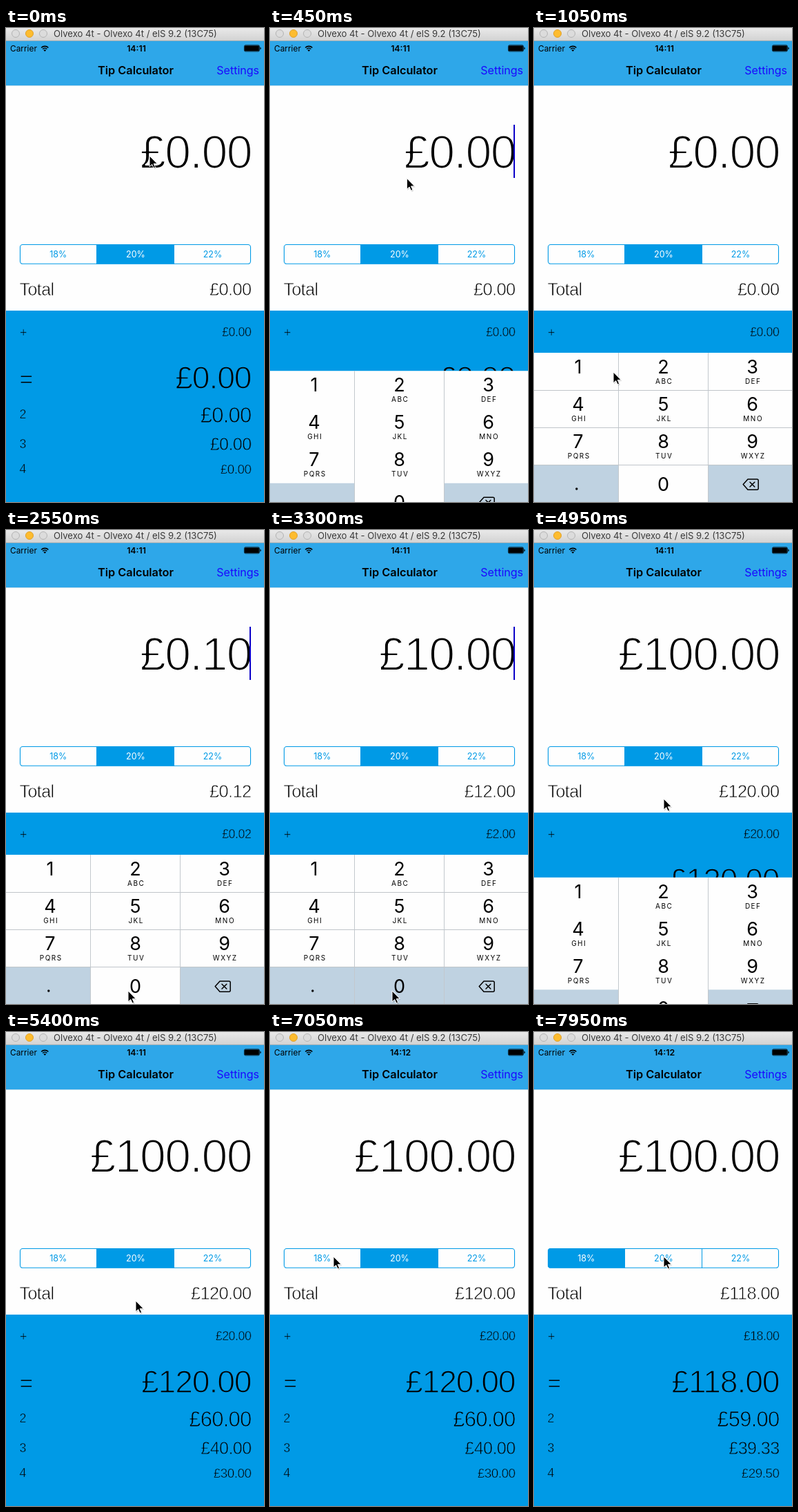
Animation of 374x686 px, one loop 8 s. Source, as an HTML page:

```html
<!DOCTYPE html>
<html lang="en">
<head>
<meta charset="utf-8">
<title>Tip Calculator</title>
<style>
  html, body { margin: 0; width: 100%; height: 100%; overflow: hidden; background: #fff; }
  svg { display: block; width: 374px; height: 686px; }
  text { font-family: Inter, Roboto, sans-serif; white-space: pre; }
  /* A background-coloured outline slims the regular face to a light one. */
  .light {
    font-family: "Liberation Sans", Arial, sans-serif;
    letter-spacing: -.024em;
    stroke: #fefefe; stroke-width: .03em; stroke-linejoin: round;
  }
  .panel { stroke: #009ae6; }
  .end { text-anchor: end; }
  .mid { text-anchor: middle; }
  .digit { font-size: 27px; text-anchor: middle; }
  .letters { font-size: 10px; letter-spacing: 1.5px; text-anchor: middle; }
  .seg { font-size: 12.5px; text-anchor: middle; }
</style>
</head>
<body>
<svg viewBox="0 0 374 686" xmlns="http://www.w3.org/2000/svg">
  <defs>
    <linearGradient id="chrome" x2="0" y2="1">
      <stop offset="0" stop-color="#e9e9e9"/><stop offset="1" stop-color="#d2d2d2"/>
    </linearGradient>
    <clipPath id="pill"><rect x="20" y="313" width="335" height="28.5" rx="4"/></clipPath>
  </defs>
  <rect width="374" height="686" fill="#fefefe"/>

  <rect y="18" width="374" height="65" fill="#2ea7e9"/>
  <rect y="83" width="374" height=".6" fill="#8fc4e2"/>
  <rect width="374" height="18.5" fill="url(#chrome)"/>
  <rect y="18" width="374" height=".7" fill="#aaa"/>
  <g stroke-width="1">
    <circle cx="14" cy="8" r="5.5" fill="#dcdcdc" stroke="#b4b4b4"/>
    <circle cx="34" cy="8" r="5.5" fill="#fdbc2f" stroke="#e0a028"/>
    <circle cx="54" cy="8" r="5.5" fill="#dcdcdc" stroke="#b4b4b4"/>
  </g>
  <text x="69" y="13" font-size="13.1" fill="#3a3a3a">Olvexo 4t - Olvexo 4t / elS 9.2 (13C75)</text>

  <text x="6" y="33.5" font-size="11.9">Carrier</text>
  <g fill="none" stroke="#000" stroke-width="1.6">
    <path d="M51.2 28.5a7.2 7.2 0 0 1 10.2 0M53.2 30.5a4.4 4.4 0 0 1 6.2 0"/>
    <path d="M56.3 34l-1.9-1.9a2.7 2.7 0 0 1 3.8 0z" fill="#000" stroke="none"/>
  </g>
  <text id="clock" class="mid" x="189" y="33.5" font-size="12.3" font-weight="600"></text>
  <rect x="345.4" y="24.9" width="22" height="9" rx="1.8" fill="none" stroke="#000" stroke-width=".8"/>
  <rect x="346" y="25.5" width="20.8" height="7.8" rx="1"/>
  <path d="M368.4 27.6a1.9 1.9 0 0 1 0 3.6z"/>
  <text class="mid" x="188" y="67" font-size="16.3" font-weight="600">Tip Calculator</text>
  <text class="end" x="367" y="67" font-size="16" fill="#1a08ff">Settings</text>

  <text id="amount" class="light end" x="356" y="203" font-size="68"></text>
  <rect id="caret" x="353" y="140" width="2" height="77" fill="#0a00c8"/>

  <g clip-path="url(#pill)" fill="#009ae6">
    <rect id="fill18" x="20" y="313" width="111.5" height="29"/>
    <rect id="fill20" x="131.5" y="313" width="112" height="29"/>
  </g>
  <path d="M131.5 313v28.5M243.5 313v28.5" stroke="#009ae6"/>
  <rect x="20.5" y="313.5" width="334" height="27.8" rx="3.6" fill="none" stroke="#009ae6" stroke-width="1.1"/>
  <text id="seg18" class="seg" x="75.7" y="331.5">18%</text>
  <text id="seg20" class="seg" x="188" y="331.5">20%</text>
  <text class="seg" x="299.5" y="331.5" fill="#009ae6">22%</text>

  <text class="light" x="19.6" y="386.5" font-size="25">Total</text>
  <text id="total" class="light end" x="355.5" y="386.5" font-size="25.4"></text>

  <rect y="409" width="374" height="277" fill="#009ae6"/>
  <text class="light panel" x="20" y="447" font-size="18">+</text>
  <text class="light panel" x="19.4" y="520" font-size="34">=</text>
  <text class="light panel" x="19.6" y="565.3" font-size="17.8">2</text>
  <text class="light panel" x="19.6" y="608.3" font-size="17.8">3</text>
  <text class="light panel" x="19.6" y="644.3" font-size="17.8">4</text>
  <text id="tip" class="light panel end" x="355.5" y="446" font-size="17.8"></text>
  <text id="sum" class="light panel end" x="355.5" y="522" font-size="46.3"></text>
  <text id="by2" class="light panel end" x="355.5" y="570.5" font-size="31"></text>
  <text id="by3" class="light panel end" x="355.5" y="611" font-size="25.1"></text>
  <text id="by4" class="light panel end" x="355.5" y="645" font-size="18.8"></text>

  <g id="keys">
    <rect y="470" width="374" height="216" fill="#fefefe"/>
    <path d="M0 632.5H122.5V686H0zM252.5 632.5H374V686H252.5z" fill="#bfd2e1"/>
    <rect id="zero" x="122.5" y="632.5" width="130" height="54" fill="#bfd2e1"/>
    <path d="M122.5 470V686M252.5 470V686" stroke="#c3c8cd"/>
    <path id="rules" d="M0 524.5H374M0 578.5H374M0 632.5H374" stroke="#c0c5ca"/>
    <g id="labels"></g>
    <circle cx="61.8" cy="667" r="1.7"/>
    <g fill="none" stroke="#000" stroke-width="1.5" stroke-linejoin="round" stroke-linecap="round">
      <path d="M310 653H323.2q2 0 2 2V666.2q0 2-2 2H310L303.2 660.6z"/>
      <path d="M313 657.2l6.8 6.8M319.8 657.2l-6.8 6.8"/>
    </g>
  </g>

  <g id="pointer">
    <path d="M1 1.5V17.5L4.7 14 7.2 19.5 9.8 18.4 7.4 13H12.4z" fill="#000" opacity=".16"/>
    <path d="M0 0V15.8L3.7 12.4 6.1 17.8 8.6 16.7 6.2 11.4H11.2z"
          fill="#000" stroke="#fff" stroke-width="1"/>
  </g>
</svg>
<script>
const LOOP = 8000, STEP = 150, KEYS_HEIGHT = 216;
const $ = id => document.getElementById(id);
const set = (id, name, value) => $(id).setAttribute(name, value);
const within = (t, spans) => spans.some(([a, b]) => t >= a && t < b);

// Pointer stops: time, x, y.
const PATH = [
  [0, 208, 185], [300, 208, 185], [1050, 115, 498], [1500, 34, 487], [1650, 34, 487],
  [2100, 150, 628], [2250, 177, 667], [3600, 177, 667], [4050, 186, 600], [4200, 186, 600],
  [4800, 188, 389], [6300, 188, 389], [7050, 92, 325], [7800, 92, 325], [7950, 188, 325]
];
const CARET = [[150, 750], [1200, 1500], [1650, 2250], [2400, 3900], [4350, 4800]];
// Each keystroke appends a digit to the amount, in pence.
const TYPED = [[1650, 1], [2550, 0], [2850, 0], [3150, 0], [3450, 0]];
const ZERO_HELD = TYPED.slice(1).map(([t]) => [t - STEP, t]);
const KEYS_UP = 265, KEYS_DOWN = 4915, PRESS = 7200, SELECT = 7350;

function buildLabels() {
  const letters = ["", "ABC", "DEF", "GHI", "JKL", "MNO", "PQRS", "TUV", "WXYZ"];
  const columns = [64, 187.5, 316.5];
  $("labels").innerHTML = letters.map((word, i) => {
    const x = columns[i % 3], y = 470 + 54 * Math.floor(i / 3);
    return `<text class="digit" x="${x}" y="${y + 30}">${i + 1}</text>` +
      `<text class="letters" x="${x + 1.2}" y="${y + 45}">${word}</text>`;
  }).join("") + '<text class="digit" x="187.5" y="669.5">0</text>';
}

function pointerAt(t) {
  const i = PATH.findIndex(stop => stop[0] > t);
  if (i < 0) return PATH[PATH.length - 1].slice(1);
  const [t0, x0, y0] = PATH[i - 1], [t1, x1, y1] = PATH[i];
  const k = (t - t0) / (t1 - t0), e = k * k * (3 - 2 * k);
  return [x0 + (x1 - x0) * e, y0 + (y1 - y0) * e];
}

// Critically damped spring from 0 to 1.
function spring(ms) {
  const u = Math.max(0, ms) * .0197;
  return 1 - (1 + u) * Math.exp(-u);
}

function drawKeys(t) {
  const hidden = 1 - spring(t - KEYS_UP) + spring(t - KEYS_DOWN);
  const moving = hidden > .04;
  set("keys", "transform", `translate(0 ${(hidden * KEYS_HEIGHT).toFixed(2)})`);
  set("keys", "visibility", hidden > .998 ? "hidden" : "visible");
  set("rules", "opacity", moving ? 0 : 1);
  set("zero", "opacity", within(t, ZERO_HELD) ? 1 : 0);
}

function drawAmounts(t) {
  const pence = TYPED.reduce((sum, [at, digit]) => t >= at ? sum * 10 + digit : sum, 0);
  const tip = pence * (t >= SELECT ? .18 : .2), total = pence + tip;
  const show = (id, value) => { $(id).textContent = "£" + (Math.round(value) / 100).toFixed(2); };
  show("amount", pence);
  show("tip", tip);
  show("total", total);
  show("sum", total);
  for (const n of [2, 3, 4]) show("by" + n, total / n);
}

function drawSegments(t) {
  const chosen = t < PRESS ? 0 : t < SELECT ? .15 : t < SELECT + STEP ? .5 : 1;
  set("fill18", "opacity", chosen);
  set("fill20", "opacity", t < SELECT ? 1 : 1 - chosen);
  set("seg18", "fill", t >= SELECT ? "#fff" : "#009ae6");
  set("seg20", "fill", t >= SELECT + STEP ? "#009ae6" : "#fff");
}

function draw(now) {
  const t = Math.floor(now % LOOP / STEP) * STEP;
  drawKeys(t);
  drawAmounts(t);
  drawSegments(t);
  $("clock").textContent = t < 6600 ? "14:11" : "14:12";
  set("caret", "opacity", within(t, CARET) ? 1 : 0);
  const [x, y] = pointerAt(t);
  set("pointer", "transform", `translate(${x.toFixed(2)} ${y.toFixed(2)})`);
}

buildLabels();
const start = performance.now();
function tick() {
  draw(performance.now() - start);
  requestAnimationFrame(tick);
}
tick();
</script>
</body>
</html>
```
